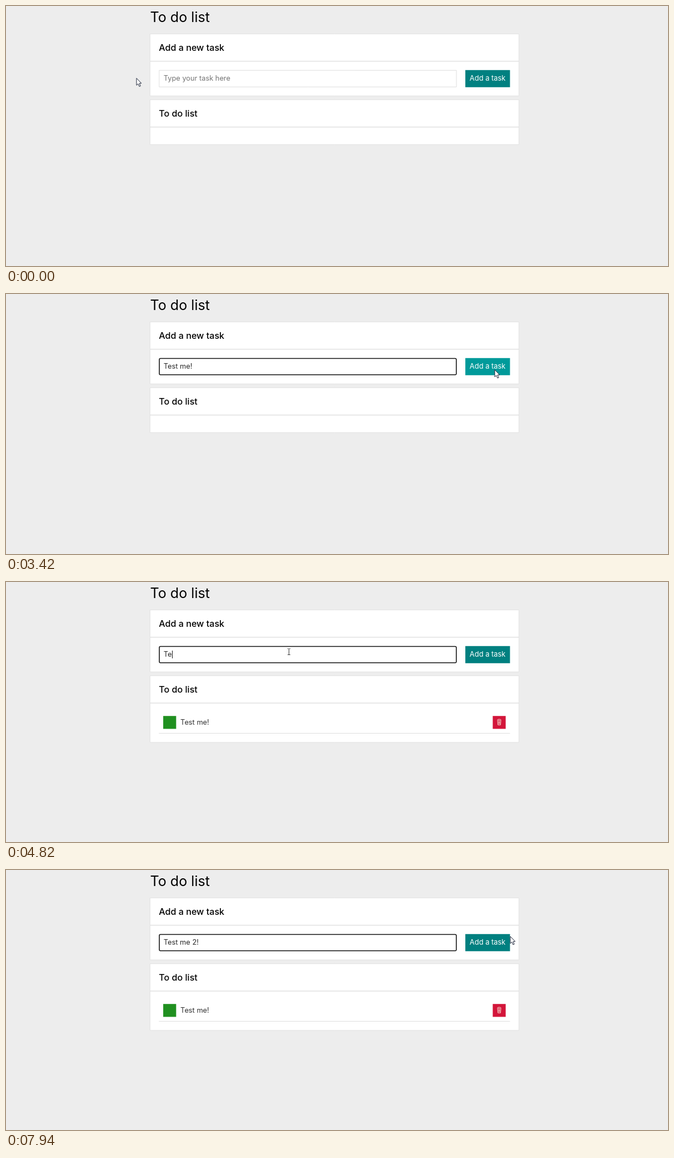
Animation, 1192 px wide and 470 px high, one loop 8000 ms. Source, as an HTML page with a canvas:

```html
<!DOCTYPE html>
<html lang="en">
<head>
<meta charset="utf-8">
<title>To do list</title>
<style>
  html, body { margin: 0; width: 100%; height: 100%; overflow: hidden; background: #ededed; }
  canvas { display: block; }
</style>
</head>
<body>
<canvas id="stage" width="1192" height="470"></canvas>
<script>
const ctx = document.getElementById('stage').getContext('2d');
const LOOP = 8000;
const FOCUS = 520, PRESS = 3500, SUBMIT = 3580, HINT = 4190;
const BLINK = 540;      // half a caret cycle
const SAMPLE = 76;      // the pointer moves in steps of this length
const FONT = 'Inter, "Open Sans", sans-serif';
const LINE = '#dedede';

// The page is shown at a reduced zoom, so its edges fall between pixels.
const ZOOM = 0.776;
const CARD = { x: 259.8, w: 663.2 };
const PAD = 20 * ZOOM;
const LEFT = CARD.x + PAD;
const RIGHT = CARD.x + CARD.w - PAD;
const BUTTON = { x: RIGHT - 80.4, y: 115.8, w: 80.4, h: 31 };
const FIELD = { x: LEFT, y: 115.8, w: BUTTON.x - PAD - LEFT, h: 31 };

// Keys struck in short bursts at an even pace
const sessions = [
  { start: FOCUS, bursts: [
    { keys: 'T', from: 1140 }, { keys: 'est', from: 1310, gap: 75 },
    { keys: ' ', from: 1610 }, { keys: 'me', from: 2090, gap: 150 }, { keys: '!', from: 2560 }
  ] },
  { start: SUBMIT, bursts: [
    { keys: 'T', from: 4590 }, { keys: 'est', from: 4820, gap: 115 },
    { keys: ' me', from: 5450, gap: 150 }, { keys: ' ', from: 6300 },
    { keys: '2', from: 6920 }, { keys: '!', from: 7400 }
  ] }
];

const home = { x: 235, y: 130.5 };
const moves = [
  { start: 200, steps: 3, x: 298, y: 132 },
  { start: 2810, steps: 5, x: 944, y: 134 },
  { start: 3190, steps: 4, x: 880, y: 137 },
  { start: 3650, steps: 6, x: 509, y: 126 },
  { start: 7720, steps: 4, x: 908, y: 120 }
];

const ease = p => p * p * (3 - 2 * p);
const between = (t, from, to) => t >= from && t < to;
const inside = (b, p) => p.x >= b.x && p.x < b.x + b.w && p.y >= b.y && p.y < b.y + b.h;

function pointerAt(t) {
  let { x, y } = home;
  for (const move of moves.filter(m => t >= m.start)) {
    const step = Math.floor((t - move.start + 8) / SAMPLE) + 1;
    const p = ease(Math.min(1, step / move.steps));
    x += (move.x - x) * p;
    y += (move.y - y) * p;
  }
  return { x: Math.round(x), y };
}

function typedAt(t) {
  const session = sessions.findLast(s => t >= s.start);
  if (!session) return { typed: '', caret: false };
  let typed = '', last = session.start;
  for (const { keys, from, gap = 0 } of session.bursts) {
    [...keys].forEach((key, i) => {
      if (t < from + i * gap) return;
      typed += key;
      last = from + i * gap;
    });
  }
  return { typed, caret: Math.floor((t - last) / BLINK) % 2 === 0 };
}

function box(x, y, w, h, color) {
  ctx.fillStyle = color;
  ctx.fillRect(x, y, w, h);
}

function frame({ x, y, w, h }, color, width = 1, radius = 0) {
  ctx.strokeStyle = color;
  ctx.lineWidth = width;
  ctx.beginPath();
  ctx.roundRect(x + width / 2, y + width / 2, w - width, h - width, radius);
  ctx.stroke();
}

function text(str, x, y, size, color = '#000', weight = 400, family = FONT) {
  ctx.font = `${weight} ${size}px ${family}`;
  ctx.fillStyle = color;
  ctx.fillText(str, x, y);
}

function card(y, h, title) {
  box(CARD.x, y, CARD.w, h, '#fff');
  frame({ x: CARD.x - 1, y: y - 1, w: CARD.w + 2, h: h + 2 }, '#e3e3e3');
  box(CARD.x, y + 48, CARD.w, 2 * ZOOM, '#e2e2e2');
  text(title, LEFT, y + 30, 16.1, '#000', 500);
}

function drawField(t) {
  const { typed, caret } = typedAt(t);
  const x = FIELD.x + 11 * ZOOM;
  const focused = t >= FOCUS && !between(t, PRESS, SUBMIT);
  if (focused) frame(FIELD, '#101010', 2 * ZOOM, 2);
  else frame(FIELD, LINE);
  if (typed) text(typed, x, 135, 12.8, '#2a2a2a');
  else text('Type your task here', x, 135, 12.8, '#757575');
  if (focused && caret) {
    box(Math.round(x + (typed && ctx.measureText(typed).width)), 124, 1, 14, '#111');
  }
}

function drawBin(x, y) {
  ctx.strokeStyle = '#f6dfd0';
  ctx.lineWidth = 1;
  ctx.beginPath();
  ctx.ellipse(x, y - 4.5, 3.3, 1.2, 0, 0, 2 * Math.PI);
  ctx.moveTo(x - 3, y - 3.5);
  ctx.lineTo(x - 2.3, y + 4.5);
  ctx.lineTo(x + 2.3, y + 4.5);
  ctx.lineTo(x + 3, y - 3.5);
  for (const rib of [-0.8, 0.8]) {
    ctx.moveTo(x + rib, y - 2);
    ctx.lineTo(x + rib, y + 3);
  }
  ctx.stroke();
}

function drawTask() {
  const size = 30 * ZOOM, inset = 10 * ZOOM, y = 242.2;
  box(LEFT + inset, y, size, size, '#209020');
  text('Test me!', LEFT + size + 2 * inset, 258, 12.8, '#333');
  box(RIGHT - inset - size, y, size, size, '#d3153a');
  drawBin(RIGHT - inset - size / 2, y + size / 2);
  box(LEFT, 273, RIGHT - LEFT, 1, LINE);
}

function drawTooltip() {
  const tip = { x: 515, y: 136, w: 82, h: 20 };
  box(tip.x, tip.y, tip.w, tip.h, '#fff');
  frame(tip, '#666');
  text('Wypełnij to pole.', 521, 150, 9.1, '#575757', 400, '"Open Sans", sans-serif');
}

function drawArrow({ x, y }) {
  ctx.save();
  ctx.translate(x, y);
  ctx.fillStyle = '#fff';
  ctx.strokeStyle = '#1c2438';
  ctx.lineWidth = 1;
  const shape = new Path2D('M0 0V12.8L2.9 10.2L5 15L7.2 14.1L5.1 9.4L8.8 9.2Z');
  ctx.fill(shape);
  ctx.stroke(shape);
  ctx.restore();
}

function drawBeam({ x, y }) {
  const top = Math.round(y) - 6;
  box(x, top + 1, 1, 11, '#333');
  for (const edge of [top, top + 11]) {
    box(x - 2, edge, 2, 1, '#444');
    box(x + 1, edge, 2, 1, '#444');
  }
}

function draw(t) {
  const pointer = pointerAt(t);
  const added = t >= SUBMIT;

  box(0, 0, 1192, 470, '#ededed');
  text('To do list', 259.5, 29, 25.1);
  card(51, 111, 'Add a new task');
  card(170, added ? 119.5 : 80, 'To do list');

  drawField(t);
  box(BUTTON.x, BUTTON.y, BUTTON.w, BUTTON.h, inside(BUTTON, pointer) ? '#009a9a' : '#008080');
  text('Add a task', BUTTON.x + 10 * ZOOM, 135, 12.9, '#fff');

  if (added) drawTask();
  if (between(t, HINT, HINT + 80)) drawTooltip();
  if (inside(FIELD, pointer)) drawBeam(pointer);
  else drawArrow(pointer);
}

const start = performance.now();
function tick() {
  draw((performance.now() - start) % LOOP);
  requestAnimationFrame(tick);
}
tick();
</script>
</body>
</html>
```
